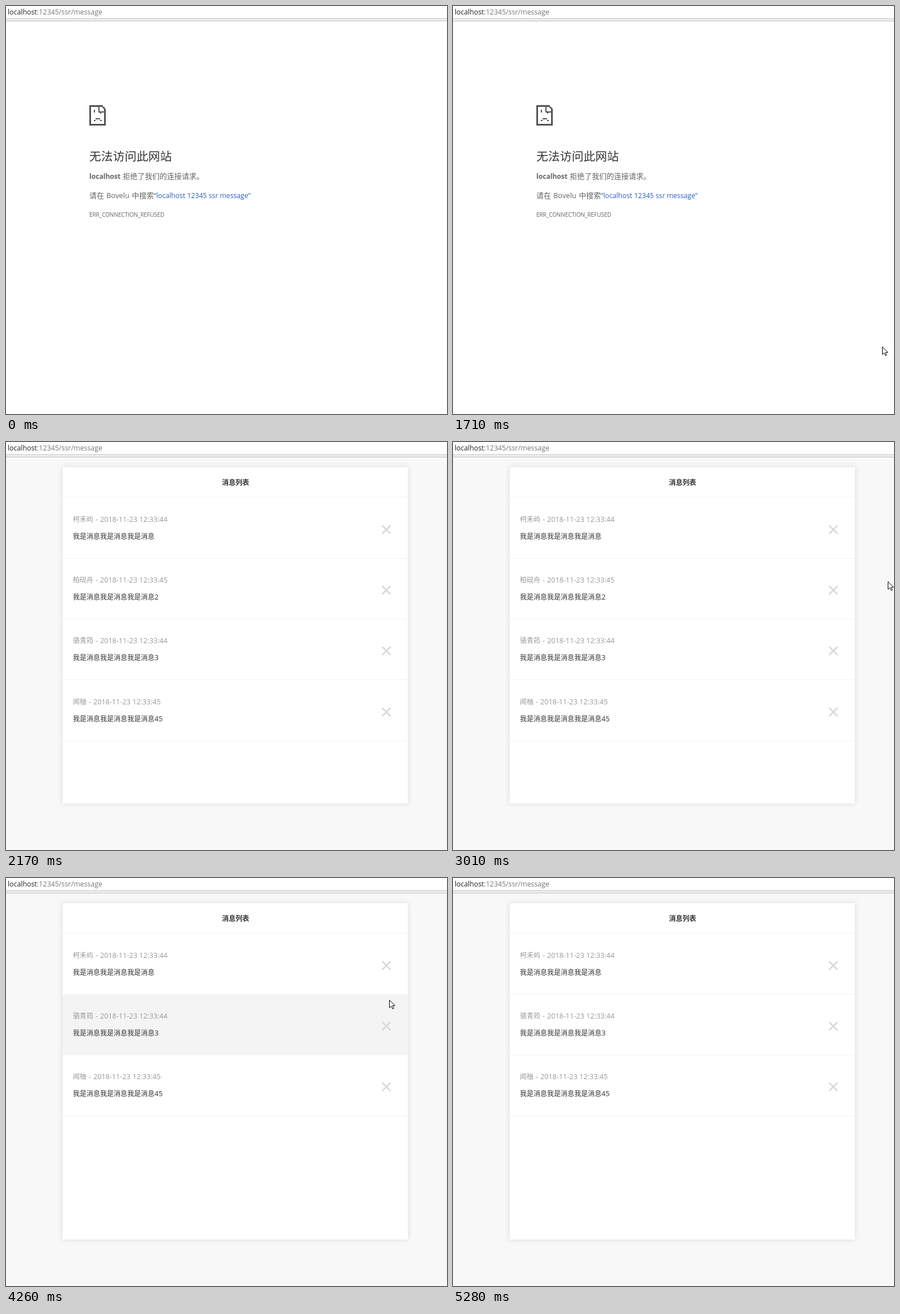
Animation, 778 px wide and 720 px high, one loop 5680 ms. Source, as an HTML page:

```html
<!DOCTYPE html>
<html lang="zh-CN">
<head>
<meta charset="utf-8">
<title>消息列表</title>
<style>
  html, body { margin: 0; height: 100%; overflow: hidden; background: #fff; }
  svg { display: block; }
  text { font: 12px "Open Sans", "Noto Sans CJK SC", "Noto Sans CJK", "Noto Sans", sans-serif; fill: #333; white-space: pre; }
  .address { font-size: 12.35px; fill: #777; }
  .address tspan { fill: #222; }
  .heading { font-size: 20.8px; }
  .error { font-size: 13px; fill: #646464; }
  .host { font-size: 12.1px; font-weight: 700; }
  .brand { font-size: 12.9px; }
  .link { font-size: 12.2px; fill: #2a62bd; }
  .code { font-size: 9.9px; fill: #646464; }
  .title { font-weight: 700; }
  .meta { fill: #999; }
  .latin { font-size: 12.6px; }
  .card { filter: drop-shadow(0 0 5px rgba(0, 0, 0, .12)); }
  .line { stroke: #f3f3f3; }
  .cross { fill: none; stroke-width: 2.8; }
  .icon { fill: none; stroke: #535353; shape-rendering: crispEdges; }
  .cursor path { fill: #fff; stroke: #000; stroke-linejoin: round; }
</style>
</head>
<body>
<svg width="778" height="720" viewBox="0 0 778 720">
  <g id="errorPage">
    <g class="icon">
      <path stroke-width="3" d="M171 176.5H148.5V209.5H174.5V181"/>
      <path stroke-width="2" d="M164 176V187H175M170 179H173V182M156 183V188M167 187V190M158 199H166M155 202H158M166 202H169"/>
    </g>
    <text class="heading" x="147" y="273">无法访问此网站</text>
    <text class="error" x="147" y="305"><tspan class="host">localhost</tspan><tspan x="206">拒绝了我们的连接请求。</tspan></text>
    <text class="error" x="147" y="339">请在<tspan class="brand" x="177">Bovelu</tspan><tspan x="222">中搜索</tspan><tspan class="link" x="261">“localhost 12345 ssr message”</tspan></text>
    <text class="code" x="147" y="372">ERR_CONNECTION_REFUSED</text>
  </g>

  <g id="listPage">
    <rect width="778" height="720" fill="#f8f8f8"/>
    <rect class="card" x="100" y="44.5" width="609" height="593.5" fill="#fff"/>
    <text class="title" x="381" y="76">消息列表</text>
    <path class="line" d="M100 97.5H709"/>
    <g id="rows"></g>
  </g>

  <rect width="778" height="27" fill="#fff"/>
  <rect y="22" width="778" height="5" fill="#f2f2f2"/>
  <path d="M0 22.5H778M0 26.5H778" stroke="#bbb"/>
  <text class="address" x="3" y="15"><tspan>localhost</tspan>:12345/ssr/message</text>

  <g id="arrow" class="cursor">
    <path d="M.5 .5V14L3.7 11L6 16L8.1 15.1L5.9 10.3H10.2Z"/>
  </g>
  <g id="hand" class="cursor">
    <path d="M0 12V2Q0 .5 1.5 .5T3 2V7Q4.5 5.5 6 7.3Q7.6 6.3 8.7 8Q10.4 7.5 10.5 9.5V14L8.5 17V19.7H1V17L-4.3 11.5Q-4.7 9.3-2.7 9.5Z"/>
    <path d="M3 7V10.5M6 7.5V10.5M8.7 8V11" fill="none"/>
  </g>
</svg>

<script>
const LOOP = 5680, LIST_SHOWN = 2170, ITEM_REMOVED = 3960, POINTER_STEP = 80;
const LEFT = 100, RIGHT = 709, ROW_HEIGHT = 107.4;
const CROSS = { x: 671, y: 56.5, arm: 7.3 };

const messages = [['柯禾屿', ''], ['柏砚舟', '2'], ['骆青筠', '3'], ['闻柚', '45']];

// Each stroke follows a Bézier curve, then rests; an empty path hides the pointer.
const strokes = [
  { at: 0, path: [] },
  { at: 150, path: [[743, 703]] },
  { at: 220, path: [] },
  { at: 1710, lasts: 160, path: [[757, 601], [758, 601]] },
  { at: 1940, path: [] },
  { at: 3010, lasts: 550, path: [[767, 246], [640, 150], [497, 310], [660, 274]] },
  { at: 3640, lasts: 90, path: [[664, 272], [670, 271]] },
  { at: 4110, lasts: 150, path: [[672, 262], [676, 215]] },
  { at: 4430, lasts: 550, path: [[660, 228], [550, 290], [550, 430], [669, 472]] },
  { at: 5050, lasts: 160, path: [[686, 545], [735, 688]] },
  { at: 5280, path: [] }
];

const byId = id => document.getElementById(id);
const show = (node, visible) => node.setAttribute('display', visible ? 'inline' : 'none');
const place = (node, x, y) => node.setAttribute('transform', `translate(${x} ${y})`);
const rowTop = i => Math.round(97.6 + i * ROW_HEIGHT);

function bezier(points, u) {
  if (points.length < 2) return points[0];
  const mixed = points.slice(1).map(([x, y], i) => [
    points[i][0] + (x - points[i][0]) * u,
    points[i][1] + (y - points[i][1]) * u
  ]);
  return bezier(mixed, u);
}

function pointerAt(time) {
  const { at, lasts = POINTER_STEP, path } = strokes.findLast(stroke => stroke.at <= time);
  const steps = Math.round(lasts / POINTER_STEP);
  const u = Math.min(1, Math.floor((time - at) / lasts * steps + 1e-6) / steps);
  return bezier(path, u)?.map(Math.round);
}

byId('rows').innerHTML = messages.map(([name, suffix], i) => {
  const nameEnd = 118 + name.length * 12;
  const { x, y, arm } = CROSS;
  return `<g>
    <rect class="back" x="${LEFT}" y="1" width="${RIGHT - LEFT}" height="107"/>
    <path class="line" d="M${LEFT} 107.5H${RIGHT}"/>
    <text class="meta" x="118" y="43">${name}<tspan class="latin" x="${nameEnd + 4}">-</tspan><tspan class="latin" x="${nameEnd + 12}">2018-11-23 12:33:${44 + i % 2}</tspan></text>
    <text x="118" y="73">${'我是消息'.repeat(3)}<tspan class="latin">${suffix}</tspan></text>
    <path class="cross" d="M${x - arm} ${y - arm}l${2 * arm} ${2 * arm}m0 ${-2 * arm}l${-2 * arm} ${2 * arm}"/>
  </g>`;
}).join('');

const rows = [...byId('rows').children];

function render(time) {
  const pointer = pointerAt(time);
  const [x, y] = pointer ?? [-1, -1];
  const listShown = time >= LIST_SHOWN;
  let overCross = false;

  show(byId('errorPage'), !listShown);
  show(byId('listPage'), listShown);

  const visible = rows.filter((row, i) => i !== 1 || time < ITEM_REMOVED);
  rows.forEach(row => show(row, visible.includes(row)));
  visible.forEach((row, i) => {
    const top = rowTop(i);
    const rowHover = x >= LEFT && x < RIGHT && y >= top && y < rowTop(i + 1);
    const crossHover = listShown && rowHover &&
      Math.abs(x - CROSS.x) < 12 && Math.abs(y - top - CROSS.y) < 15;
    overCross ||= crossHover;
    place(row, 0, top);
    row.querySelector('.back').setAttribute('fill', rowHover ? '#f4f4f4' : '#fff');
    row.querySelector('.cross').setAttribute('stroke', crossHover ? '#a0a0a0' : '#dadada');
  });

  show(byId('arrow'), pointer && !overCross);
  show(byId('hand'), pointer && overCross);
  place(byId(overCross ? 'hand' : 'arrow'), x, y);
}

function tick() {
  render(performance.now() % LOOP);
  requestAnimationFrame(tick);
}
tick();
</script>
</body>
</html>
```
